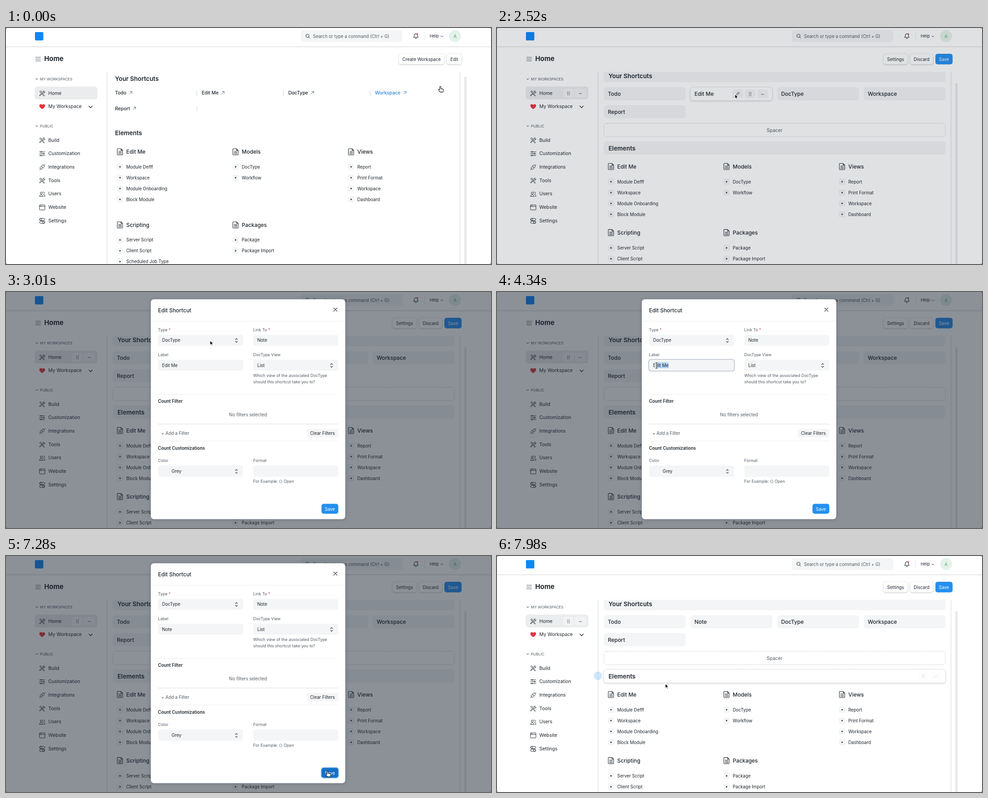
An HTML page with a canvas for the animation above (8000 ms loop, 1072x522 px).

```html
<!DOCTYPE html>
<html lang="en">
<head>
<meta charset="utf-8">
<title>Workspace shortcuts</title>
<style>
html, body { margin: 0; width: 100%; height: 100%; overflow: hidden; background: #fff; }
canvas { display: block; width: 1072px; height: 522px; }
</style>
</head>
<body>
<canvas id="stage"></canvas>
<script>
const W = 1072, H = 522, LOOP = 8000, TICK = 70, ZOOM = 0.745;
const INK = '#1f272e', MUTED = '#505a62', SOFT = '#f4f5f6', LINE = '#ededef', BLUE = '#2490ef';

const canvas = document.getElementById('stage');
const dpr = window.devicePixelRatio || 1;
canvas.width = W * dpr;
canvas.height = H * dpr;
const c = canvas.getContext('2d');

const clamp = v => Math.max(0, Math.min(1, v));
const ease = u => u < 0.5 ? 2 * u * u : 1 - 2 * (1 - u) * (1 - u);
const easeOut = u => 1 - (1 - u) ** 3;

// ---- drawing helpers ----
function text(s, x, y, px = 13, color = INK, weight = 400, align = 'left') {
  const size = px * ZOOM;
  c.font = `${weight} ${size}px Inter, "Liberation Sans", sans-serif`;
  c.textAlign = align;
  c.fillStyle = color;
  c.fillText(s, x, y + size * 0.364);
  return c.measureText(s).width;
}

function box(x, y, w, h, r, fill, stroke, lw = 1) {
  c.beginPath();
  c.roundRect(x, y, w, h, r);
  if (fill) { c.fillStyle = fill; c.fill(); }
  if (stroke) { c.strokeStyle = stroke; c.lineWidth = lw; c.stroke(); }
}

function raised(x, y, w, h, r, blur = 3) {
  c.save();
  c.shadowColor = 'rgba(25,39,52,.22)';
  c.shadowBlur = blur * dpr;
  c.shadowOffsetY = dpr;
  box(x, y, w, h, r, '#fff');
  c.restore();
  box(x, y, w, h, r, null, 'rgba(25,39,52,.09)', 0.8);
}

function dot(x, y, r, fill) {
  c.beginPath();
  c.arc(x, y, r, 0, 7);
  c.fillStyle = fill;
  c.fill();
}

function icon(path, x, y, color = INK, lw = 0.95, fill) {
  c.save();
  c.translate(x, y);
  c.lineWidth = lw;
  c.lineJoin = c.lineCap = 'round';
  if (fill) { c.fillStyle = fill; c.fill(path); }
  if (color) { c.strokeStyle = color; c.stroke(path); }
  c.restore();
}

const ring = (x, y, r) => `M${x - r} ${y}a${r} ${r} 0 1 0 ${2 * r} 0a${r} ${r} 0 1 0 ${-2 * r} 0`;

const I = {
  tools: 'M-5 5.5L1-.5M-5.5-4l2-1.6 2.6 2.2-1.7 2zM-1-1.6L5 5.2 3.6 6-.6 1.6M1.4-1.6a3 3 0 0 1 3-4L3.2-3.6l1.3 1.3 1.7-1a3 3 0 0 1-4 2.8M-5 5.5l-1-1L-1.2-.6',
  sliders: 'M-6-4H-3.4M-.8-4H6M-6 0H1.6M4.2 0H6M-6 4H-3.8M-1.2 4H6' + ring(-2.1, -4, 1.3) + ring(2.9, 0, 1.3) + ring(-2.5, 4, 1.3),
  plug: 'M-6 6l2-2M6-6L4-4M-4 4a3 3 0 0 1 0-4l1.5-1.5 4 4L0 4a3 3 0 0 1-4 0M4-4a3 3 0 0 1 0 4L2.5 1.5l-4-4L0-4a3 3 0 0 1 4 0',
  users: ring(-2, -2, 2.3) + 'M-6 5c0-4.6 8-4.6 8 0zM1.5-4a2.2 2.2 0 1 1 1.4 4M4 5h2.2c0-2.4-1-3.6-2.7-4',
  site: 'M-5-5.4H5q1 0 1 1V4.6q0 1-1 1H-5q-1 0-1-1V-4.4q0-1 1-1M-6-2.2H6M-4-3.8h.2M-2.4-3.8h.2',
  toggles: 'M-3.4-5.4H3.4a2.4 2.4 0 0 1 0 4.8H-3.4a2.4 2.4 0 0 1 0-4.8M-3.4 .9H3.4a2.4 2.4 0 0 1 0 4.8H-3.4a2.4 2.4 0 0 1 0-4.8' + ring(-3.2, -3, 2.3) + ring(3.2, 3.3, 2.3),
  file: 'M-5-7H2.2L5.8-3.4V5.6q0 1.2-1.2 1.2H-4.8q-1.2 0-1.2-1.2V-6q0-1 1-1M2.2-7v3.6h3.6M-3.2-1.2H3.4M-3.2 1.4H3.4M-3.2 4H3.4',
  down: 'M-2.4-1.2L0 1.2 2.4-1.2',
  wide: 'M-3.8-2L0 2 3.8-2',
  sort: 'M-2.2-2L0-4.2 2.2-2M-2.2 2L0 4.2 2.2 2',
  away: 'M-2.8 2.8L2.8-2.8M-1.6-2.8H2.8V1.6',
  find: ring(-0.7, -0.7, 3.6) + 'M2 2L4.4 4.4',
  bell: 'M-5 3.2H5Q3.6 2 3.6-1A3.6 3.6 0 0 0-3.6-1Q-3.6 2-5 3.2M-1.4 5.2q1.4 1 2.8 0',
  close: 'M-3.6-3.6L3.6 3.6M3.6-3.6L-3.6 3.6',
  plus: 'M-4 0H4M0-4V4',
  pencil: 'M-3.8 3.8l.6-2.4L2-3.8 3.8-2-1.4 3.2z',
  menu: 'M-5.5-4H5.5M-5.5 0H5.5M-5.5 4H5.5',
  heart: 'M0 5.6C-4 2.8-6.2.8-6.2-2A3.2 3.2 0 0 1 0-3.4 3.2 3.2 0 0 1 6.2-2C6.2.8 4 2.8 0 5.6Z',
  arrow: 'M0 0V10.6L2.5 8.4 4.1 12.2 5.9 11.4 4.3 7.7H7.6Z',
  hand: 'M-1.3 7V1.2a1.3 1.3 0 0 1 2.6 0V4.6l4 .8q1.7.5 1.5 2.2l-.6 3.4q-.3 1.4-1.5 1.4H.6q-1 0-1.7-1L-3.8 8q-.7-1.4.6-1.7Z',
  beam: 'M-2-6.5Q0-6.5 0-5.5Q0-6.5 2-6.5M0-5.5V5.5M-2 6.5Q0 6.5 0 5.5Q0 6.5 2 6.5'
};
for (const k in I) I[k] = new Path2D(I[k]);

function grip(x, y, color = MUTED) {
  for (let i = 0; i < 6; i++) dot(x - 1.7 + (i % 2) * 3.4, y - 3.2 + (i >> 1) * 3.2, 0.9, color);
}
function more(x, y) {
  for (let i = -1; i <= 1; i++) dot(x + i * 2.3, y + 0.6, 0.75, INK);
}

// ---- pointer: [start, end, x, y] ----
const MOVES = [
  [0, 420, 989, 67], [1050, 1890, 482, 145], [1890, 2170, 535, 144],
  [2450, 2660, 494, 153], [2660, 3010, 451, 107], [3010, 3220, 421, 106],
  [3500, 3920, 387, 180], [3920, 4060, 385, 162], [4200, 4480, 320, 163],
  [5200, 5201, 339, 161], [6020, 6580, 678, 441], [6650, 7000, 711, 476],
  [7350, 7980, 372, 282]
];

function pointer(t) {
  let x = 960, y = 129.5;
  for (const [a, b, px, py] of MOVES) {
    if (t <= a) break;
    const u = ease(clamp((t - a) / (b - a)));
    x += (px - x) * u;
    y += (py - y) * u;
  }
  return [x, y];
}

function drawPointer(t) {
  if (t >= 5110 && t < 6090) return;
  const [x, y] = pointer(t);
  if (t < 1190 || (t >= 2100 && t < 2520) || (t >= 6930 && t < 7420)) icon(I.hand, x, y, '#111', 1.1, '#fff');
  else if (t >= 3990 && t < 5110) { icon(I.beam, x, y, '#fff', 2.4); icon(I.beam, x, y, '#111', 1); }
  else icon(I.arrow, x, y, '#fff', 1.2, '#000');
}

// ---- page frame ----
function button(label, x, w, primary) {
  if (primary) box(x, 57, w, 23.5, 5, BLUE);
  else raised(x, 57, w, 23.5, 5);
  text(label, x + w / 2, 69, 13, primary ? '#fff' : INK, 400, 'center');
}

function drawNav(t) {
  c.fillStyle = LINE;
  c.fillRect(0, 40, W, 3);
  box(64, 9, 18.5, 18.5, 2, '#0f87f5');
  box(652, 5, 224, 26, 5, SOFT);
  icon(I.find, 667, 18);
  text('Search or type a command (Ctrl + G)', 678.5, 18, 13, MUTED);
  icon(I.bell, 906, 17.5, INK, 1.1);
  dot(909.5, 13, 1.5, '#e24c4c');
  c.fillStyle = '#e2e6e9';
  c.fillRect(925, 9, 1, 18);
  text('Help', 936.5, 18, 12.4);
  icon(I.down, 963.5, 18.5);
  dot(992.5, 18, 13.2, '#e4f2e9');
  text('A', 992.5, 18.3, 13, '#5aa37c', 400, 'center');

  icon(I.menu, 71, 68.7, MUTED, 1.1);
  text('Home', 84.5, 68, 20, INK, 700);
  if (t < 700) {
    button('Create Workspace', 868, 101);
    button('Edit', 974, 33.5);
  } else {
    button('Settings', 854, 54);
    button('Discard', 913, 51);
    button('Save', 969, 38, true);
  }
}

const PUBLIC = [
  ['Build', 'tools'], ['Customization', 'sliders'], ['Integrations', 'plug'], ['Tools', 'tools'],
  ['Users', 'users'], ['Website', 'site'], ['Settings', 'toggles']
];

function drawSidebar(t) {
  icon(I.down, 68, 113);
  text('MY WORKSPACES', 75, 112.6, 11, MUTED);
  box(63.5, 129.5, 138.5, 28.5, 6, '#ebeced');
  icon(I.tools, 80, 144.5);
  text('Home', 93.5, 144, 14);
  if (t >= 840) {
    box(146, 134.5, 24, 19, 4, '#f2f3f4');
    box(172, 134.5, 24, 19, 4, '#f2f3f4');
    grip(158, 144.5);
    more(184, 144.5);
  }
  icon(I.heart, 80, 174, null, 1, '#e5323c');
  text('My Workspace', 93.5, 173.7, 14);
  icon(I.wide, 187, 174.5, INK, 1.2);
  icon(I.down, 68, 217);
  text('PUBLIC', 75, 216.6, 11, MUTED);
  PUBLIC.forEach(([label, name], i) => {
    const y = 247.8 + i * 29.7;
    icon(I[name], 80, y + 0.5);
    text(label, 93.5, y, 14);
  });
}

// ---- main column ----
const CARDS = [
  ['Edit Me', 0, 0, ['Module Defff', 'Workspace', 'Module Onboarding', 'Block Module']],
  ['Models', 1, 0, ['DocType', 'Workflow']],
  ['Views', 2, 0, ['Report', 'Print Format', 'Workspace', 'Dashboard']],
  ['Scripting', 0, 1, ['Server Script', 'Client Script', 'Scheduled Job Type']],
  ['Packages', 1, 1, ['Package', 'Package Import']]
];

function drawCards(top, second, gap) {
  for (const [title, col, row, items] of CARDS) {
    const x = 252 + col * 255.4, y = row ? second : top;
    icon(I.file, x, y, INK, 1.05);
    text(title, x + 13.7, y, 16, INK, 500);
    items.forEach((s, i) => {
      const iy = y + gap + i * 24;
      box(x - 7, iy - 7, 14, 14, 3, SOFT);
      dot(x, iy, 1.5, INK);
      text(s, x + 13.7, iy, 13);
    });
  }
}

const NAMES = ['Todo', 'Edit Me', 'DocType', 'Workspace', 'Report'];

function drawView(t) {
  text('Your Shortcuts', 241, 112.2, 18, INK, 600);
  NAMES.forEach((s, i) => {
    const x = 241 + (i % 4) * 191.5, y = i < 4 ? 143.5 : 178;
    const hot = i === 3 && t < 140;
    const w = text(s, x, y, 14, hot ? '#2f86d6' : INK, 500);
    icon(I.away, x + w + 9.5, y - 0.3, hot ? '#2f86d6' : MUTED, 0.9);
    if (i !== 3) {
      c.fillStyle = '#cfd2d6';
      c.fillRect(x + 180.2, y - 4.5, 1, 11);
    }
  });
  text('Elements', 241, 232.5, 18, INK, 600);
  drawCards(274, 435.7, 33);
}

const BLOCKS = [
  { s: 'Your Shortcuts', x: 236, y: 91, w: 755.5, head: true },
  ...NAMES.map((s, i) => ({ s, x: 236 + (i % 4) * 191.5, y: i < 4 ? 131 : 170.5, w: 181 })),
  { s: 'Elements', x: 236, y: 251, w: 755.5, head: true }
];
const TARGET = BLOCKS[2];

function hovered(t) {
  if (t >= 2520 && t < 2800) return TARGET;
  if (t < 840 || (t >= 2520 && t < 7840)) return null;
  const [x, y] = pointer(t);
  return BLOCKS.find(b => x >= b.x && x <= b.x + b.w && y >= b.y && y <= b.y + 31.5);
}

function drawTools(b, t, alpha) {
  const right = b.x + b.w, y = b.y + 14.5;
  const overPencil = t >= 2030 && t < 2520;
  c.globalAlpha = alpha;
  if (!b.head) {
    box(right - 88.5, y - 9.5, 24, 19, 4, overPencil ? '#a9b0b6' : SOFT);
    icon(I.pencil, right - 76.5, y, INK, 0.95);
  }
  box(right - 60.5, y - 9.5, 23, 19, 4, SOFT);
  box(right - 33, y - 9.5, 23, 19, 4, SOFT);
  grip(right - 49, y + 0.7);
  more(right - 21.5, y + 0.7);
  c.globalAlpha = 1;
}

function drawPlus(b, alpha) {
  c.globalAlpha = alpha;
  dot(b.x - 13, b.y + 14, 9.2, BLUE);
  icon(I.plus, b.x - 13, b.y + 14, '#fff', 1.1);
  c.globalAlpha = 1;
}

function drawEditor(t) {
  const hot = hovered(t);
  let age = 0;
  while (hot && age < 2 && hovered(t - (age + 1) * TICK) === hot) age++;
  const alpha = 0.22 + 0.39 * age;

  for (const b of BLOCKS) {
    if (b === hot) raised(b.x, b.y, b.w, 29.5, 6, 4);
    else box(b.x, b.y, b.w, 29, 6, SOFT);
    const label = b === TARGET && t >= 7350 ? 'Note' : b.s;
    if (b.head) text(label, b.x + 10.5, b.y + 14.8, 18, INK, 600);
    else text(label, b.x + 9, b.y + 14.8, 16, INK, 500);
    if (b === hot) drawTools(b, t, alpha);
  }
  c.setLineDash([2, 1.6]);
  box(236.5, 210.8, 754.5, 29.6, 6, null, '#c3c8cd');
  c.setLineDash([]);
  text('Spacer', 613.5, 226.6, 14, MUTED, 400, 'center');
  drawCards(306.5, 452.6, 33.6);
  if (hot && t < 2520 || t >= 7840 && hot) drawPlus(hot, alpha);
}

function drawMain(t) {
  c.fillStyle = '#f0f0f1';
  c.fillRect(222, 97, 3, H);
  c.fillRect(1002, 97, 3, H);
  box(1013, t < 840 ? 108 : 122, 5, H, 2, '#e9e9ea');
  c.save();
  c.beginPath();
  c.rect(0, 97, W, H);
  c.clip();
  if (t < 770) drawView(t);
  else drawEditor(t);
  c.restore();
}

// ---- dialog ----
function field(label, x, y, value, { req, select, dx = 9 } = {}) {
  const w = text(label, x, y - 23.2, 12, MUTED);
  if (req) text('*', x + w + 2.5, y - 22.5, 12, '#e24c4c');
  box(x, y - 12.3, 188, 24.6, 5, SOFT);
  text(value, x + dx, y, 13);
  if (select) icon(I.sort, x + 173.2, y + 0.4, INK, 1.05);
}

function labelValue(t) {
  if (t < 5110) return 'Edit Me';
  return 'Note'.slice(0, 1 + (t >= 5250) + (t >= 5600) + (t >= 5670));
}

function drawLabelField(t) {
  const value = labelValue(t), x = 336, y = 162;
  const focused = t >= 4270 && t < 7280;
  field('Label', x, y, '');
  if (focused) box(x - 0.7, y - 13, 189.4, 26, 5.5, SOFT, '#bcc4cd', 1.7);
  if (t >= 4270 && t < 5110) {
    c.font = `400 ${13 * ZOOM}px Inter, "Liberation Sans", sans-serif`;
    const full = c.measureText(value).width;
    const from = Math.max(345, Math.min(345 + full, pointer(t)[0]));
    c.fillStyle = '#b3d4fc';
    c.fillRect(from, y - 6.5, 345 + full - from, 13);
  }
  const w = text(value, 345, y, 13);
  const caret = t < 5670 || Math.floor((t - 5640) / 530) % 2 === 0;
  if (focused && t >= 5110 && caret) {
    c.fillStyle = '#111';
    c.fillRect(345 + w, y - 6, 1, 12);
  }
}

function rule(x, y, w, color = LINE) {
  c.fillStyle = color;
  c.fillRect(x, y, w, 1);
}

function drawDialog(t) {
  const hide = clamp((t - 7390) / 150);
  const alpha = clamp((t - 2700) / 150) * (1 - hide);
  if (!alpha) return;
  c.save();
  c.globalAlpha = alpha;
  c.translate(0, -37 * (1 - easeOut(clamp((t - 2700) / 300)) + clamp((t - 7390) / 300)));
  raised(320, 16, 430, 486.5, 7, 8);
  text('Edit Shortcut', 336, 40.6, 16, INK, 500);
  icon(I.close, 728, 39, INK, 1.3);
  rule(320, 64, 430);

  field('Type', 336, 106.7, 'DocType', { req: true, select: true });
  field('Link To', 546.5, 106.7, 'Note', { req: true });
  drawLabelField(t);
  field('DocType View', 546.5, 162, 'List', { select: true });
  text('Which view of the associated DocType', 546.5, 184.5, 12, MUTED);
  text('should this shortcut take you to?', 546.5, 198.7, 12, MUTED);

  rule(336, 226, 392);
  text('Count Filter', 336, 241.3, 13, INK, 600);
  text('No filters selected', 535, 271.7, 13, MUTED, 400, 'center');
  rule(336, 291.5, 398.5, '#d9dcdf');
  text('+ Add a Filter', 343.5, 312.4, 13, MUTED);
  box(665, 303, 69.5, 18.6, 4, SOFT);
  text('Clear Filters', 699.5, 312.4, 13, INK, 400, 'center');
  rule(336, 329, 398.5);
  text('Count Customizations', 336, 345, 13, INK, 600);
  field('Color', 336, 396.4, 'Grey', { select: true, dx: 30 });
  field('Format', 546.5, 396.4, '');
  text('For Example: {} Open', 546.5, 419, 12, MUTED);

  const pressed = t >= 7280;
  if (pressed) box(696.5, 467.8, 38.6, 23.4, 6, null, '#a9d2f8', 2);
  box(697.3, 468.6, 37.2, 21.9, 5, pressed ? '#1371c8' : BLUE);
  text('Save', 716, 480, 13, '#fff', 400, 'center');
  c.restore();
}

function drawBackdrop(t) {
  const a = clamp((t - 2480) / 150) * (1 - clamp((t - 7700) / 150));
  if (t < 2520 || !a) return;
  c.fillStyle = `rgba(26,36,50,${a * 0.5})`;
  c.fillRect(0, 0, W, H);
}

function drawCorners() {
  c.beginPath();
  c.rect(0, 0, W, H);
  c.roundRect(0, 0, W, H, 3);
  c.fillStyle = '#444';
  c.fill('evenodd');
}

function draw(t) {
  c.setTransform(dpr, 0, 0, dpr, 0, 0);
  c.fillStyle = '#fff';
  c.fillRect(0, 0, W, H);
  drawNav(t);
  drawSidebar(t);
  drawMain(t);
  drawBackdrop(t);
  drawDialog(t);
  drawPointer(t);
  drawCorners();
}

const start = performance.now();
function loop() {
  const t = (performance.now() - start) % LOOP;
  draw(Math.floor(t / TICK) * TICK);
  requestAnimationFrame(loop);
}
loop();
</script>
</body>
</html>
```
